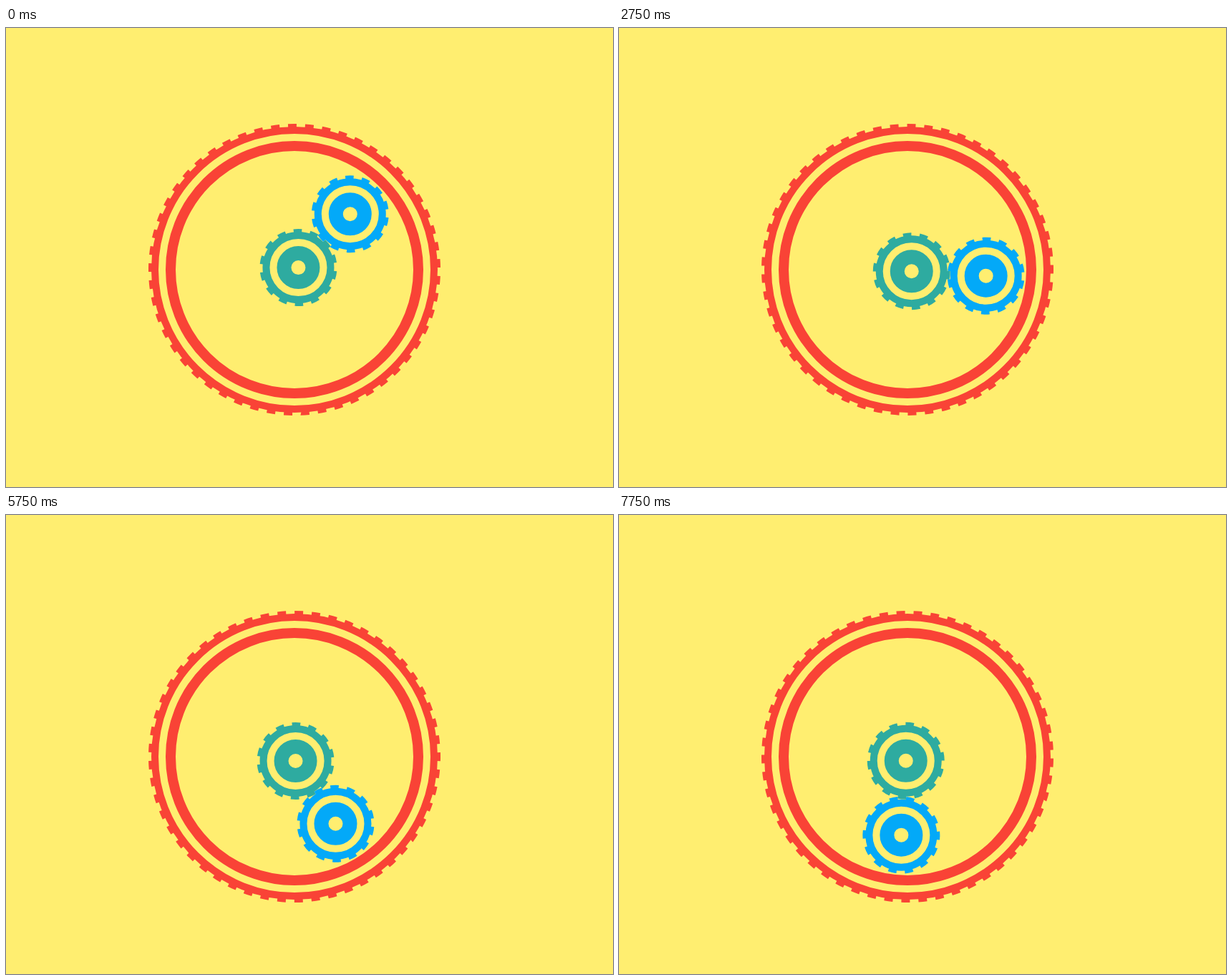
Recreate the animation shown at these times as an HTML page. Size 848 by 642 pixels, loop 8 s.

```html
<!DOCTYPE html>
<html lang="en">
<head>
<meta charset="utf-8">
<title>Gears</title>
<style>
  html, body { margin: 0; width: 100%; height: 100%; overflow: hidden; background: #ffee70; }
  svg { display: block; width: 848px; height: 642px; }
  circle { fill: none; }
</style>
</head>
<body>
<svg id="stage" viewBox="0 0 848 642"></svg>
<script>
const LOOP = 8000, STEP = 250;
const HUB = { x: 403, y: 338 };
const ORBIT = { start: 45, speed: 18 }; // degrees, degrees per second

// x, y: place in the orbiting carrier; rings: [outer, inner] radii;
// spin: degrees per second; phase: angle of a tooth from the top at t = 0
const gears = [
  { color: '#f94336', x: 0, y: 0, teeth: 53, rings: [[200, 190], [180, 166]], spin: -9, phase: -0.85 },
  { color: '#2eaba0', x: 1.8, y: -5.9, teeth: 14, rings: [[50, 40], [30, 10]], spin: 54, phase: -1 },
  { color: '#03a9f8', x: 0, y: -110, teeth: 14, rings: [[50, 40], [30, 10]], spin: -18, phase: -1 }
];

const stage = document.getElementById('stage');

function add(parent, name, attrs) {
  const el = document.createElementNS('http://www.w3.org/2000/svg', name);
  for (const key in attrs) el.setAttribute(key, attrs[key]);
  return parent.appendChild(el);
}

function ring(parent, outer, inner, extra) {
  return add(parent, 'circle', { r: (outer + inner) / 2, 'stroke-width': outer - inner, ...extra });
}

for (const gear of gears) {
  gear.el = add(stage, 'g', { stroke: gear.color });
  for (const [outer, inner] of gear.rings) ring(gear.el, outer, inner);
  const rim = gear.rings[0][0];
  gear.rim = ring(gear.el, rim + 4, rim - 1, {
    pathLength: gear.teeth * 2,
    'stroke-dasharray': '1 1'
  });
}

function draw(ms) {
  const t = ms / 1000;
  const a = (ORBIT.start + ORBIT.speed * t) * Math.PI / 180;
  const cos = Math.cos(a), sin = Math.sin(a);
  for (const { el, rim, x, y, teeth, spin, phase } of gears) {
    const px = HUB.x + x * cos - y * sin;
    const py = HUB.y + x * sin + y * cos;
    el.setAttribute('transform', `translate(${px} ${py})`);
    rim.setAttribute('transform', `rotate(${phase + spin * t - 90 - 90 / teeth})`);
  }
}

function tick() {
  const ms = performance.now() % LOOP;
  draw(Math.floor(ms / STEP) * STEP);
  requestAnimationFrame(tick);
}
tick();
</script>
</body>
</html>
```
